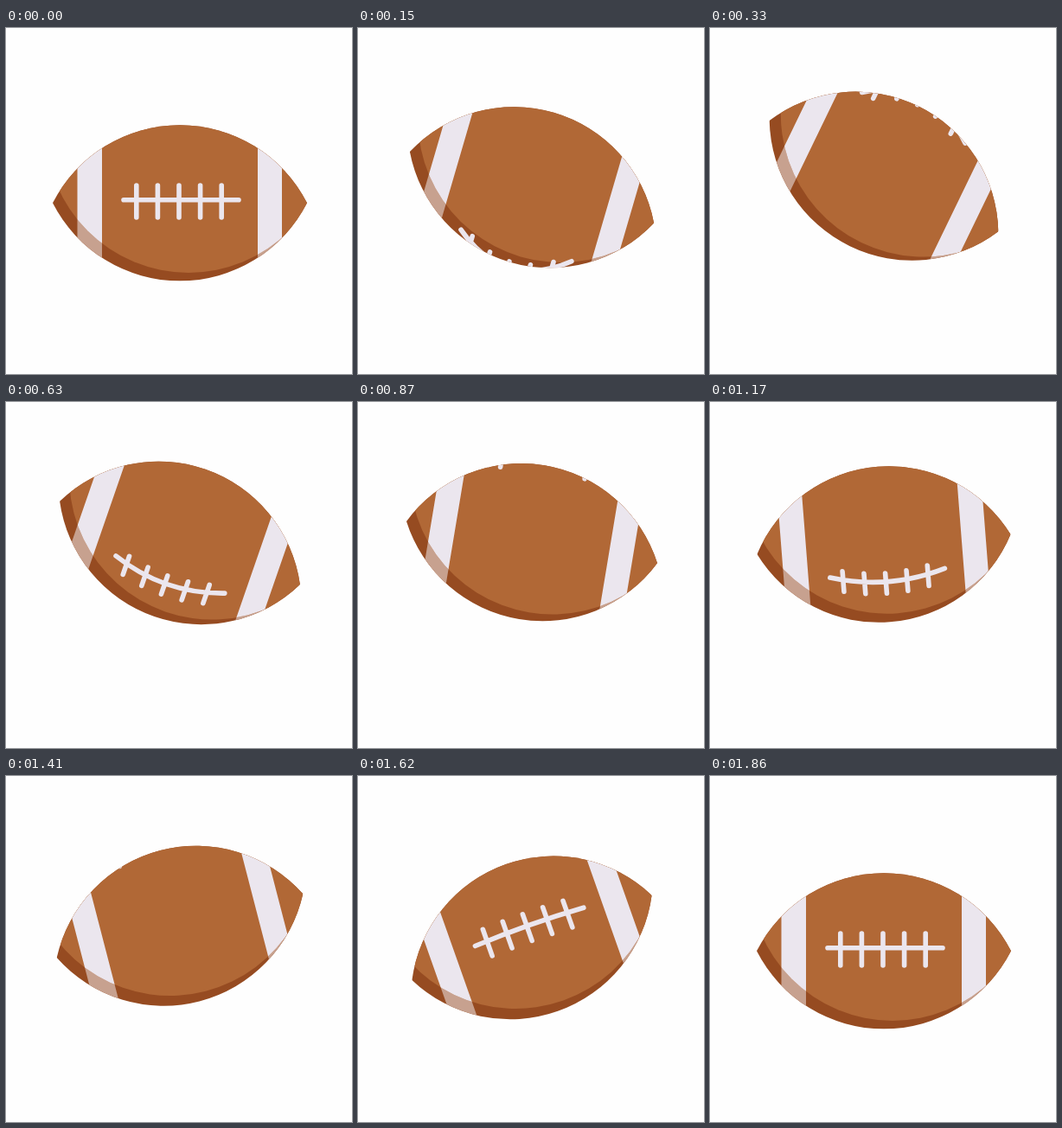
Recreate the animation shown at these times as an HTML page. Size 400 px wide and 400 px high, loop 3920 ms.

```html
<!DOCTYPE html>
<html lang="en">
<head>
<meta charset="utf-8">
<title>Spinning football</title>
<style>
  html, body { margin: 0; width: 100%; height: 100%; overflow: hidden; background: #fefefe; }
  svg { display: block; width: 100%; height: 100%; }
</style>
</head>
<body>
<svg viewBox="0 0 400 400">
  <defs>
    <clipPath id="lens"><path d="M-147 0A165 165 0 0 1 147 0A165 165 0 0 1 -147 0Z"/></clipPath>
    <clipPath id="lit"><circle cx="10" cy="-84.4" r="165"/></clipPath>
    <path id="bands" d="M-118.5 -100h28.5v200h-28.5zM90 -100h28v200h-28z"/>
  </defs>
  <g id="ball">
    <g clip-path="url(#lens)">
      <rect x="-150" y="-100" width="300" height="200" fill="#964b21"/>
      <use href="#bands" fill="#c7a18f"/>
      <g clip-path="url(#lit)">
        <rect x="-150" y="-100" width="300" height="200" fill="#b16836"/>
        <use href="#bands" fill="#ebe6ee"/>
      </g>
      <path id="laces" fill="none" stroke="#ebe6ee" stroke-width="5.6" stroke-linecap="round"/>
    </g>
  </g>
</svg>
<script>
const LOOP = 3920, STEP = 30, END = 1860;
const SPIN = 550, TURNS = 3, PEAK = 930;
const LACE_Y = -3.6;
const ball = document.getElementById('ball');
const laces = document.getElementById('laces');

const bezier = (x1, y1, x2, y2) => {
  const at = (a, b, u) => 3 * a * u * (1 - u) ** 2 + 3 * b * u * u * (1 - u) + u ** 3;
  return p => {
    let lo = 0, hi = 1;
    for (let i = 0; i < 24; i++) {
      const mid = (lo + hi) / 2;
      if (at(x1, x2, mid) < p) lo = mid; else hi = mid;
    }
    return at(y1, y2, lo);
  };
};

const fall = bezier(.6, 0, .8, .9);
const tilts = [
  { t: 0, v: 0, ease: bezier(.3, .2, .6, 1) },
  { t: 300, v: 26, ease: bezier(.333, .03, .75, 1) },
  { t: 1650, v: -19.6, ease: bezier(.4, 0, .7, .8) },
  { t: END, v: 0 }
];

function tilt(t) {
  const i = tilts.findIndex(k => t < k.t);
  if (i < 1) return 0;
  const a = tilts[i - 1], b = tilts[i];
  return a.v + (b.v - a.v) * a.ease((t - a.t) / (b.t - a.t));
}

function lift(t) {
  if (t >= END) return 0;
  if (t < PEAK) return 40.2 * (1 - (1 - t / PEAK) ** 3.4);
  return 40.2 * (1 - fall((t - PEAK) / (END - PEAK)));
}

// Lace distance from rest: leaves downward, returns from the top.
function roll(t) {
  if (t >= SPIN * TURNS) return 0;
  const s = t % SPIN, left = SPIN - s;
  return s < 220 ? .67 * s : -(.36 * left + .0004 * left * left);
}

function lacePath(d) {
  const bow = d * (.165 + .0011 * Math.abs(d));
  const half = 8 + 10.5 * Math.exp(-Math.abs(d) / 45);
  const y = x => LACE_Y + d - bow * ((x - 1) / 67) ** 2;
  const x0 = -65, x1 = 68;
  // Control point of the quadratic with the same vertex.
  const cy = 2 * (LACE_Y + d) - (y(x0) + y(x1)) / 2;
  let path = `M${x0} ${y(x0)}Q${(x0 + x1) / 2} ${cy} ${x1} ${y(x1)}`;
  for (let i = -2; i <= 2; i++) {
    const x = -1 + 24.6 * i;
    path += `M${x} ${y(x) + 1.8 - half}v${2 * half}`;
  }
  return path;
}

function draw(ms) {
  const t = Math.min(Math.floor(ms / STEP) * STEP, END);
  ball.setAttribute('transform', `translate(201 ${202.3 - lift(t)}) rotate(${tilt(t)})`);
  laces.setAttribute('d', lacePath(roll(t)));
}

const start = performance.now();
function tick() {
  draw((performance.now() - start) % LOOP);
  requestAnimationFrame(tick);
}
tick();
</script>
</body>
</html>
```
